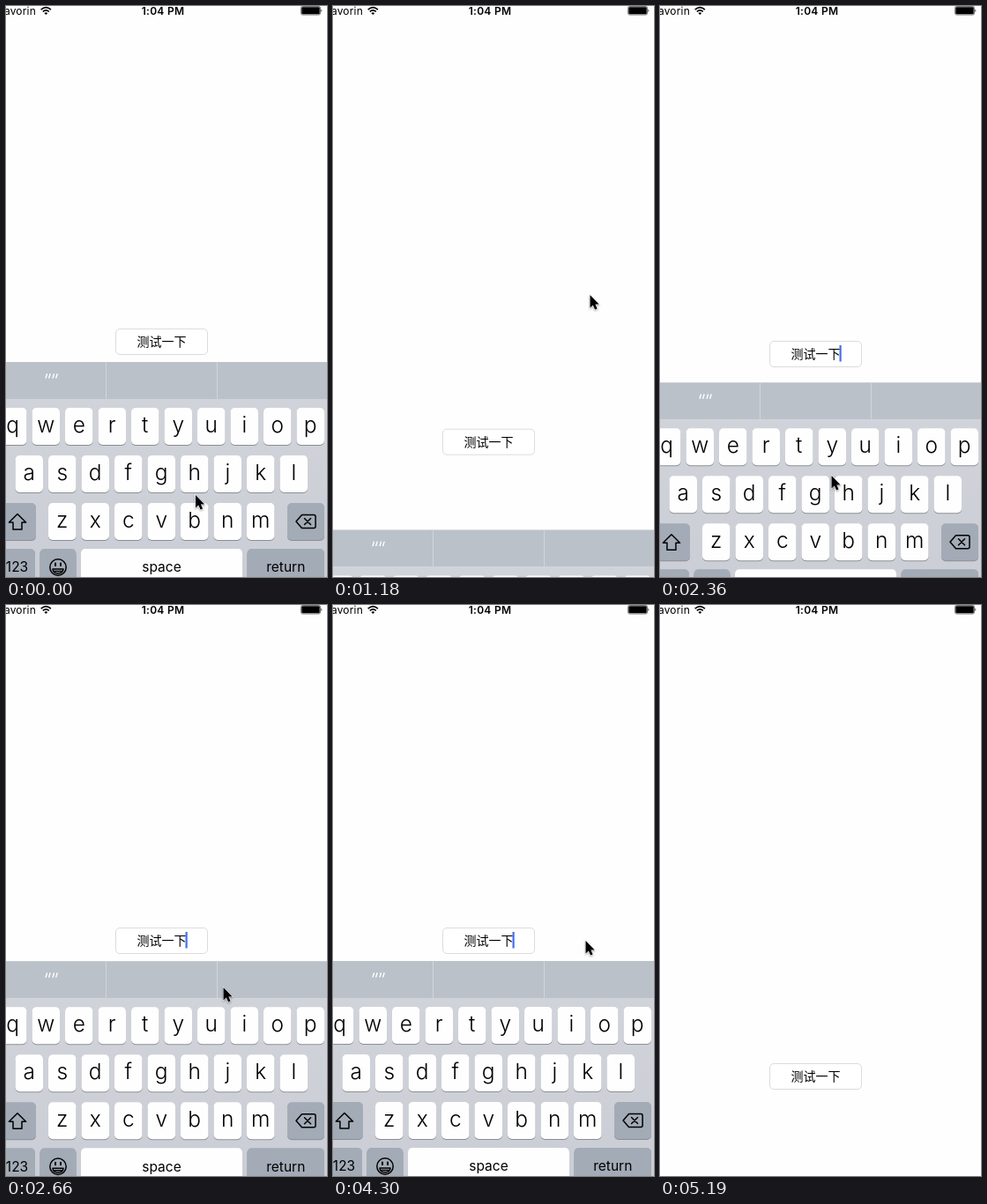
An HTML page for the animation above (6260 ms loop, 364 by 648 pixels).

```html
<!DOCTYPE html>
<html lang="en">
<head>
<meta charset="utf-8">
<title>Keyboard avoidance</title>
<style>
  html, body { margin: 0; width: 100%; height: 100%; overflow: hidden; background: #fefefe; }
  svg { display: block; width: 364px; height: 648px; }
  text { font-family: Inter, Roboto, sans-serif; fill: #000; text-anchor: middle; }
  .status { font-size: 12px; }
  .network { text-anchor: end; letter-spacing: .2px; }
  .clock { font-weight: 600; letter-spacing: .3px; }
  .field { font: 14px "Noto Sans CJK SC", "Noto Sans CJK", sans-serif; }
  .letter { font-size: 24.5px; font-weight: 300; }
  .label { font-size: 15.5px; }
  .icon { fill: none; stroke: #000; stroke-width: 1.5; stroke-linejoin: round; stroke-linecap: round; }
  #cursor { filter: drop-shadow(0 1px 1px rgba(0, 0, 0, .35)); }
</style>
</head>
<body>
<svg viewBox="0 0 364 648" xmlns="http://www.w3.org/2000/svg">
  <defs>
    <linearGradient id="tray" x1="0" y1="0" x2="0" y2="1">
      <stop offset="0" stop-color="#d0d3d9"/>
      <stop offset="1" stop-color="#cacdd5"/>
    </linearGradient>
  </defs>

  <g id="statusBar">
    <text class="status network" x="34" y="10">Tavorin</text>
    <g fill="none" stroke="#000" stroke-width="1.7">
      <path d="M39.7 4.2 Q45.3 -.8 50.9 4.2"/>
      <path d="M41.8 6.4 Q45.3 3.3 48.8 6.4"/>
    </g>
    <path d="M43.4 7.9 Q45.3 6.4 47.2 7.9 L45.3 9.9Z"/>
    <text class="status clock" x="178" y="10">1:04 PM</text>
    <rect x="334.5" y=".5" width="22" height="9.5" rx="1.8" fill="#fff" stroke="#777"/>
    <rect x="335.3" y="1.3" width="20.4" height="7.9" rx="1"/>
    <path d="M357.5 3.4 Q359.3 5.2 357.5 7Z"/>
  </g>

  <g id="keyboard">
    <rect y="42" width="364" height="216" fill="url(#tray)"/>
    <rect width="364" height="42" fill="#bac1c9"/>
    <path d="M113.5 0V42M239.5 0V42" stroke="#d0d5da"/>
    <path d="M45 18.5l1.6-5.3M48.6 18.5l1.6-5.3M53 18.5l1.6-5.3M56.6 18.5l1.6-5.3" stroke="#fff" stroke-width="1.4"/>
    <g id="keys"></g>
    <path class="icon" d="M13 172.5L22.6 182H18V190H8V182H3.4Z"/>
    <g class="icon">
      <path d="M335.5 173.5H349Q351 173.5 351 175.5V186.5Q351 188.5 349 188.5H335.5L329 181Z"/>
      <path d="M338.5 177.5L345.5 184.5M345.5 177.5L338.5 184.5"/>
    </g>
    <g class="icon">
      <circle cx="59" cy="233" r="9.2"/>
      <path d="M53 235H65Q64.5 240 59 240T53 235ZM54 237.5H64"/>
      <path d="M56 228.5V231M62 228.5V231" stroke-width="2"/>
    </g>
  </g>

  <g id="input">
    <rect x="124.5" y=".5" width="104" height="29" rx="4.5" fill="#fff" stroke="#dcdcdc"/>
    <text class="field" x="176.5" y="20">测试一下</text>
    <rect id="caret" x="203.5" y="5" width="2.2" height="18.5" fill="#476dea"/>
  </g>

  <path id="cursor" d="M0 0V14.4L3.3 11.4L5.6 16.5L8.1 15.4L5.9 10.4H10.2Z" stroke="#fff" stroke-width="1.1" paint-order="stroke"/>
</svg>
<script>
  const LOOP = 6260;
  const $ = id => document.getElementById(id);
  const clamp = v => Math.min(1, Math.max(0, v));

  function add(tag, attrs, text = '') {
    const el = document.createElementNS('http://www.w3.org/2000/svg', tag);
    for (const k in attrs) el.setAttribute(k, attrs[k]);
    el.textContent = text;
    $('keys').append(el);
  }

  function key(x, y, width, label, dark, cls = 'label') {
    const box = { x, width, height: 42, rx: 5 };
    add('rect', { ...box, y: y + 1, fill: '#8b8e94' });
    add('rect', { ...box, y, fill: dark ? '#a3abb6' : '#fefefe' });
    if (label) add('text', { class: cls, x: x + width / 2, y: y + (cls === 'letter' ? 27.5 : 26.3) }, label);
  }

  // Letter rows: characters, left edge, top edge
  [['qwertyuiop', -8, 52], ['asdfghjkl', 10.5, 106], ['zxcvbnm', 48, 160]].forEach(([row, x, y]) =>
    [...row].forEach((c, i) => key(x + 37.5 * i, y, 31.5, c, false, 'letter')));
  key(-8, 160, 42, '', true);
  key(319, 160, 42, '', true);
  key(-8, 212, 41, '123', true);
  key(38.5, 212, 41, '', true);
  key(85, 212, 183, 'space', false);
  key(273.5, 212, 87.5, 'return', true);

  // The picture refreshes at these times (ms)
  const ticks = [0, 140, 290, 440, 580, 730, 880, 1180, 1330, 1480, 1620, 1760, 1910, 2060, 2210,
    2360, 2510, 2660, 2810, 2960, 3110, 3260, 3710, 3860, 4150, 4300, 4440, 4590, 4740, 4890, 5040, 5190];

  // Pointer stops: time, x, y
  const stops = [[0, 215, 555], [880, 291.5, 328], [1180, 291.5, 328], [1760, 191.5, 517],
    [2060, 194.5, 533], [2360, 194.5, 533], [2660, 246.5, 434], [2960, 286.5, 381],
    [4590, 286.5, 381], [5190, 372, 470], [LOOP, 372, 470]];

  function pointer(t) {
    const i = stops.findIndex(s => s[0] > t);
    const [t0, x0, y0] = stops[i - 1], [t1, x1, y1] = stops[i];
    const u = (t - t0) / (t1 - t0), e = u * u * (3 - 2 * u);
    return [x0 + (x1 - x0) * e, y0 + (y1 - y0) * e];
  }

  // Critically damped spring from 0 to 1
  function spring(ms) {
    const w = Math.max(0, ms) * 0.01826;
    return 1 - (1 + w) * Math.exp(-w);
  }

  function lowered(t) {
    if (t >= 4500) return spring(t - 4500);
    return t >= 2140 ? 1 - spring(t - 2140) : spring(t - 1036);
  }

  function caretAlpha(t) {
    if (t >= 1036 && t < 2300 || t >= 4500) return 0;
    const m = t % 1000;
    return Math.min(clamp((m - 80) / 130), clamp((850 - m) / 170));
  }

  const move = (id, x, y) => $(id).setAttribute('transform', `translate(${x} ${y})`);
  const settle = v => Math.abs(v - Math.round(v)) < 0.2 ? Math.round(v) : v;

  function draw(now) {
    const clock = now % LOOP;
    const t = ticks.filter(k => k <= clock).pop();
    const p = lowered(t);
    move('keyboard', 0, settle(404 + 258 * p));
    move('input', 0, settle(366 + 154 * p));
    move('cursor', ...pointer(t));
    $('caret').setAttribute('opacity', caretAlpha(t));
  }

  const start = performance.now();
  function loop() {
    draw(performance.now() - start);
    requestAnimationFrame(loop);
  }
  loop();
</script>
</body>
</html>
```
